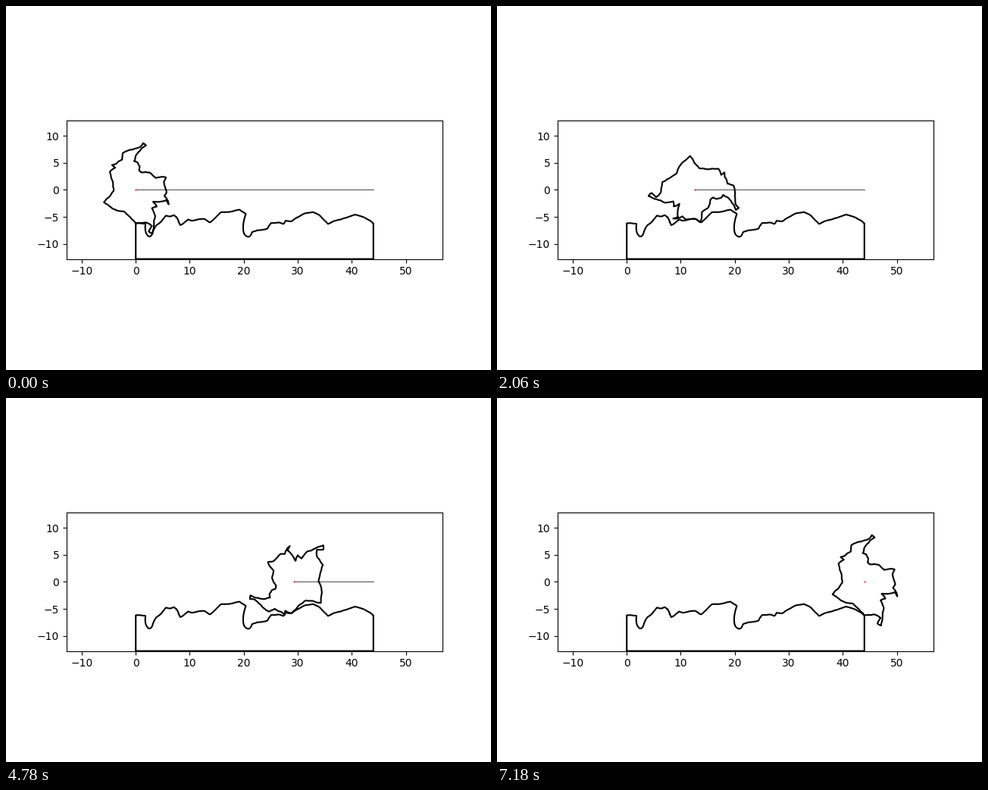
Recreate the animation shown at these times as a matplotlib script. Size 640 by 480 pixels, loop 7200 ms.

```python
import numpy as np
import matplotlib.pyplot as plt
from matplotlib.animation import FuncAnimation
from matplotlib.path import Path

FRAMES = 360
LENGTH = 44.0
MARGIN = 12.8

# Main corners of the wheel around its hub, clockwise from the north tip
CORNERS = np.array([
    (1.4, 8.6), (1.9, 8.2), (1.1, 7.7), (0.4, 6.9), (-0.3, 5.3),
    (0.3, 5.1), (0.7, 4.4), (0.6, 3.6), (1.1, 3.2), (2.5, 3.2),
    (3.7, 2.2), (5.6, 2.3), (5.2, 1.4), (5.7, -0.5), (5.3, -1.1),
    (6.1, -2.7), (5.6, -1.9), (3.2, -2.2), (3.9, -3.1), (3.0, -3.4),
    (3.6, -4.9), (3.1, -8.1), (2.4, -7.7), (3.0, -6.7), (2.1, -6.1),
    (0.0, -6.2), (-1.2, -4.9), (-2.2, -4.0), (-4.4, -3.4), (-5.9, -2.3),
    (-4.1, -0.2), (-4.3, 1.6), (-4.8, 3.3), (-3.8, 4.1), (-4.4, 4.6),
    (-3.7, 4.8), (-2.5, 5.6), (-2.4, 6.8), (-1.0, 7.4), (0.8, 7.9),
])


def coastline(points, depth=3, rough=0.08, straight=3.0):
    """Closed outline with midpoints shifted sideways; the longest side stays straight."""
    rng = np.random.default_rng(4)
    for _ in range(depth):
        side = np.roll(points, -1, axis=0) - points
        shift = rng.uniform(-rough, rough, len(points))
        shift[np.hypot(*side.T) > straight] = 0
        normal = np.c_[-side[:, 1], side[:, 0]]
        middle = points + side / 2 + normal * shift[:, None]
        points = np.stack([points, middle], axis=1).reshape(-1, 2)
    return np.vstack([points, points[:1]])


def distance_field(outline, axis):
    """Signed distance to the outline on a square grid, negative inside."""
    x, y = np.meshgrid(axis, axis)
    best = np.full(x.shape, np.inf)
    for (px, py), (qx, qy) in zip(outline[:-1], outline[1:]):
        dx, dy = qx - px, qy - py
        t = np.clip(((x - px) * dx + (y - py) * dy) / (dx * dx + dy * dy), 0, 1)
        best = np.minimum(best, (x - px - t * dx) ** 2 + (y - py - t * dy) ** 2)
    inside = Path(outline).contains_points(np.c_[x.ravel(), y.ravel()])
    return np.where(inside.reshape(x.shape), -1, 1) * np.sqrt(best)


def bilinear(field, axis, x, y):
    h = axis[1] - axis[0]
    u = np.clip((x - axis[0]) / h, 0, len(axis) - 1.001)
    v = np.clip((y - axis[0]) / h, 0, len(axis) - 1.001)
    i, j = u.astype(int), v.astype(int)
    u, v = u - i, v - j
    low = field[j, i] * (1 - u) + field[j, i + 1] * u
    high = field[j + 1, i] * (1 - u) + field[j + 1, i + 1] * u
    return low * (1 - v) + high * v


def pose(k):
    """Hub position and clockwise turn of the wheel."""
    s = k / (FRAMES - 1)
    return LENGTH * s, 2 * np.pi * s


def rotate(x, y, angle):
    cos, sin = np.cos(angle), np.sin(angle)
    return x * cos - y * sin, x * sin + y * cos


def carve(outline):
    """Ground field left over after the wheel has passed in every pose."""
    axis = np.linspace(-9.6, 9.6, 241)
    field = distance_field(outline, axis)
    xs = np.linspace(0, LENGTH, 551)
    ys = np.linspace(-9.5, -2.5, 89)
    ground = np.full((len(ys), len(xs)), 5.0)
    for k in range(FRAMES):
        hub_x, turn = pose(k)
        lo, hi = np.searchsorted(xs, (hub_x - 9, hub_x + 9))
        x, y = np.meshgrid(xs[lo:hi] - hub_x, ys)
        d = bilinear(field, axis, *rotate(x, y, turn))
        ground[:, lo:hi] = np.minimum(ground[:, lo:hi], d)
    return xs, ys, ground


def road_line(ax, outline):
    contour = ax.contour(*carve(outline), levels=[0])
    top = max(contour.allsegs[0], key=len)
    contour.remove()
    if top[0, 0] > top[-1, 0]:
        top = top[::-1]
    return np.vstack([(0, -MARGIN), top, (LENGTH, -MARGIN), (0, -MARGIN)])


fig, ax = plt.subplots(figsize=(6.4, 4.8), dpi=100)
shape = coastline(CORNERS)

ax.plot(*road_line(ax, shape).T, "k", lw=1.5)
wheel, = ax.plot([], [], "k", lw=1.5)
track, = ax.plot([], [], "k", lw=0.5)
hub, = ax.plot([], [], "r.", ms=1)

ax.set_aspect("equal")
ax.set_xlim(-MARGIN, LENGTH + MARGIN)
ax.set_ylim(-MARGIN, MARGIN)


def update(k):
    hub_x, turn = pose(k)
    x, y = rotate(*shape.T, -turn)
    wheel.set_data(hub_x + x, y)
    track.set_data([hub_x, LENGTH], [0, 0])
    hub.set_data([hub_x], [0])
    return wheel, track, hub


anim = FuncAnimation(fig, update, frames=FRAMES, interval=20,
                     repeat=True, repeat_delay=0)
plt.show()
```
